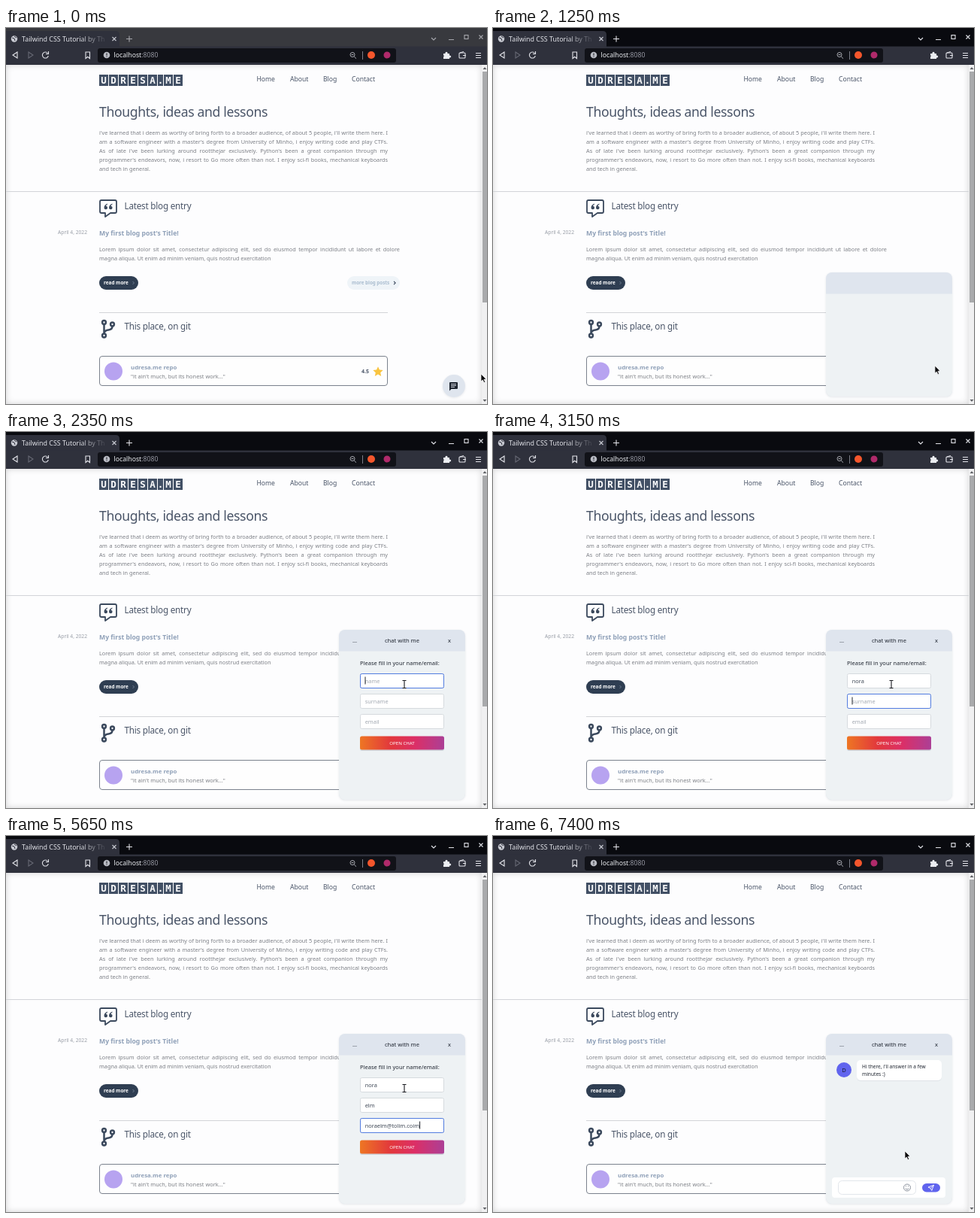
These frames come from a looping animation (640x500 px, 8 s). An HTML page:

```html
<!DOCTYPE html>
<html lang="en">
<head>
<meta charset="utf-8">
<title>Blog with chat</title>
<style>
  html, body { margin: 0; width: 100%; height: 100%; overflow: hidden; background: #fdfdfe; }
  body { position: relative; font-family: "Noto Sans", "Open Sans", sans-serif; }
  svg { position: absolute; left: 0; top: 0; display: block; }
  .stage { width: 640px; height: 500px; }
  .page { position: absolute; left: 0; top: 49px; width: 633px; height: 451px;
          box-shadow: inset 0 0 9px rgba(0, 0, 0, .17); }
  .ink { fill: #4a5568; }
  .title { font-size: 17.6px; letter-spacing: -.35px; }
  .section { font-size: 11.7px; letter-spacing: -.22px; }
  .icon { fill: none; stroke: #e3e4ea; stroke-width: 1.1; }
  .dark { fill: none; stroke: #3b495d; stroke-width: 1.8; stroke-linejoin: round; }
  .mid { text-anchor: middle; }

  .copy { position: absolute; left: 124px; font-size: 7.3px; font-weight: 300;
          line-height: 12px; color: #7c7f85; }
  .copy div { height: 12px; text-align: justify; text-align-last: justify; word-spacing: -.3px; }
  .copy div:last-child { text-align-last: left; word-spacing: 0; }
  .about { top: 133px; width: 384px; }
  .lorem { top: 288px; width: 400px; }

  .chat { position: absolute; overflow: hidden; background: #dfe5ee;
          box-shadow: 0 1px 3px rgba(60, 70, 90, .12); animation: open 8s ease-out infinite; }
  .chat svg { width: 168px; height: 226px; }
  .strip { animation: strip 8s step-end infinite; }
  .controls { animation: controls 8s step-end infinite; }
  .bubble { animation: bubble 8s linear infinite; }
  .body { animation: body 8s step-end infinite; }
  .labels { animation: labels 8s linear infinite; }
  .form { animation: form 8s linear infinite; }
  .talk { animation: talk 8s linear infinite; }
  .mouse { animation: mouse 8s ease-in-out infinite; }
  .arrow { animation: arrow 8s step-end infinite; }
  .beam { animation: beam 8s step-end infinite; }

  @keyframes open {
    0%, 11.25% { left: 581px; top: 461px; width: 30px; height: 30px; border-radius: 15px; }
    12.5%, 13.75% { left: 443px; top: 461px; width: 168px; height: 30px; border-radius: 8px; }
    17.5%, 100% { left: 443px; top: 263px; width: 168px; height: 226px; border-radius: 8px; }
  }
  @keyframes strip { 0% { fill: #38393e; } 11.25%, 100% { fill: #090a0f; } }
  @keyframes controls { 0% { opacity: .65; } 11.25%, 100% { opacity: 1; } }
  @keyframes bubble { 0%, 11.25% { opacity: 1; } 11.9%, 100% { opacity: 0; } }
  @keyframes body { 0% { opacity: 0; } 13.75%, 100% { opacity: 1; } }
  @keyframes labels { 0%, 16.5% { opacity: 0; } 18.5%, 100% { opacity: 1; } }
  @keyframes form { 0%, 17% { opacity: 0; } 19%, 89.5% { opacity: 1; } 90.5%, 100% { opacity: 0; } }
  @keyframes talk { 0%, 90% { opacity: 0; } 92.2%, 100% { opacity: 1; } }
  @keyframes mouse {
    0%, 6.25% { transform: translate(632px, 460px); }
    10.6%, 13.75% { transform: translate(596px, 465px); }
    21.5%, 86.25% { transform: translate(530px, 335px); }
    89.4%, 100% { transform: translate(548px, 419px); }
  }
  @keyframes arrow { 0% { opacity: 1; } 20.6% { opacity: 0; } 86.6%, 100% { opacity: 1; } }
  @keyframes beam { 0% { opacity: 0; } 20.6% { opacity: 1; } 86.6%, 100% { opacity: 0; } }
</style>
</head>
<body>
<div class="page"></div>

<svg class="stage" viewBox="0 0 640 500">
  <defs>
    <linearGradient id="fade" gradientUnits="userSpaceOnUse" x1="98" x2="135" y1="0" y2="0">
      <stop stop-color="#e1e2e8"/><stop offset="1" stop-color="#32343f"/>
    </linearGradient>
    <linearGradient id="sunset">
      <stop stop-color="#ee7623"/><stop offset=".36" stop-color="#e2383c"/>
      <stop offset=".65" stop-color="#dc2f66"/><stop offset="1" stop-color="#ac3f96"/>
    </linearGradient>
  </defs>

  <!-- browser -->
  <rect class="strip" width="640" height="25"/>
  <path d="M0 25V4h146q5 0 5 5v16z" fill="#2f313c"/>
  <rect y="24.5" width="640" height="24.5" fill="#2f313c"/>
  <circle cx="11" cy="14.5" r="4.2" fill="#c9cbd3"/>
  <path d="M8 13l3 1 1 3M11 11l3 2" fill="none" stroke="#2f313c"/>
  <path d="M141.5 12l5 5m0-5l-5 5" stroke="#c9cbd3" stroke-width="1.1"/>
  <text x="21" y="17.8" font-size="8.9" fill="url(#fade)">Tailwind CSS Tutorial by Th</text>
  <g class="icon controls">
    <path d="M160 14.5h8m-4-4v8M566 13l3 3 3-3M589 15.5h7M629.5 9.5l5 5m0-5l-5 5"/>
    <rect x="610" y="9.5" width="5" height="5"/>
  </g>
  <g class="icon">
    <path d="M15 32l-6 4 6 4z"/>
    <path d="M30 32l6 4-6 4z" stroke="#666874"/>
    <path d="M55.5 33.5a4 4 0 1 0 .8 3.5M56.5 31v3.5h-3.5"/>
    <path d="M106 32h5.5v8.5l-2.75-2.2-2.75 2.2z"/>
  </g>
  <rect x="122" y="27" width="397" height="19" rx="3" fill="#111218"/>
  <circle cx="134" cy="36" r="4.3" fill="#b9bbc3"/>
  <path d="M134 33.5v3m0 1v1" stroke="#111218"/>
  <text x="143.5" y="39.3" font-size="8.7" fill="#eceef2">localhost<tspan fill="#9799a3">:8080</tspan></text>
  <g fill="none" stroke="#b9bbc3" stroke-width=".9">
    <circle cx="461" cy="35.5" r="3"/>
    <path d="M463.3 38l2.7 2.7M459.5 35.5h3"/>
  </g>
  <path d="M474.5 31v11" stroke="#7b7d87"/>
  <circle cx="486" cy="36" r="5" fill="#f4562c"/>
  <circle cx="507" cy="36" r="4.5" fill="#b02a6b"/>
  <path d="M582 34h2.5a1.6 1.6 0 1 1 3 0h2.5v2.5a1.6 1.6 0 1 1 0 3v1.5h-8v-2.5a1.5 1.5 0 0 0 0-2.5z" fill="#eceef2"/>
  <g class="icon">
    <rect x="603" y="33" width="8" height="7" rx="1"/>
    <path d="M604 33l5-1.5M608 36.5h4M625 33.5h7m-7 3h7m-7 3h7"/>
  </g>

  <!-- scrollbar -->
  <rect x="633" y="49" width="7" height="451" fill="#f0f0f1"/>
  <rect x="634" y="58" width="6" height="307" fill="#a9aaac"/>
  <path d="M634.5 55l2.5-3 2.5 3zM634.5 494l2.5 3 2.5-3z" fill="#606266"/>

  <!-- header -->
  <g id="logo" class="mid" font-family="'DejaVu Sans Mono', monospace" font-weight="700" font-size="12.5"></g>
  <g class="ink" font-size="8.6">
    <text x="333.5" y="71.2">Home</text><text x="378" y="71.2">About</text>
    <text x="422" y="71.2">Blog</text><text x="460" y="71.2">Contact</text>
  </g>
  <text class="ink title" x="124" y="118">Thoughts, ideas and lessons</text>
  <path d="M0 217.5h633" stroke="#d2d4d8"/>

  <!-- latest entry -->
  <path class="dark" d="M127 229h18q2 0 2 2v13q0 2-2 2h-6l-7 5v-5h-5q-2 0-2-2v-13q0-2 2-2z"/>
  <path d="M135 233.5q-4.5 1.5-4.5 5.5a2.3 2.3 0 1 0 2.5-2.3q.3-1.5 2-2.2zm6.5 0q-4.5 1.5-4.5 5.5a2.3 2.3 0 1 0 2.5-2.3q.3-1.5 2-2.2z" fill="#3b495d"/>
  <text class="ink section" x="157.5" y="241">Latest blog entry</text>
  <text x="69" y="274.3" font-size="6.7" font-weight="300" fill="#9a9fa8">April 4, 2022</text>
  <text x="124" y="276" font-size="8.65" font-weight="700" fill="#8fa0b8">My first blog post's Title!</text>
  <rect x="124" y="330" width="52" height="18" rx="9" fill="#2f3e52"/>
  <text x="130" y="341.3" font-size="6.4" font-weight="700" fill="#fff">read more</text>
  <path d="M168.5 337l2 2-2 2" fill="none" stroke="#6d7c90"/>
  <rect x="454" y="330" width="70" height="18" rx="9" fill="#eff4f8"/>
  <text x="460" y="341.3" font-size="6.25" font-weight="700" fill="#a9bccf">more blog posts</text>
  <path d="M516 336.8l2.2 2.2-2.2 2.2" fill="none" stroke="#3b495d" stroke-width="1.1"/>
  <path d="M124 378.5h384" stroke="#d2d4d8"/>

  <!-- repository -->
  <g class="dark" stroke-width="2.5" style="stroke-width: 2.5">
    <circle cx="130.5" cy="391.5" r="2.4"/><circle cx="130.5" cy="409" r="2.4"/>
    <circle cx="141.5" cy="394" r="2.4"/>
    <path d="M130.5 394v13M141.5 396.5q0 4.5-5 5-5 .5-6 4"/>
  </g>
  <text class="ink section" x="157.5" y="401">This place, on git</text>
  <rect x="124.5" y="436.5" width="383" height="39" rx="3.5" fill="#fefefe" stroke="#7b828d"/>
  <circle cx="143" cy="456.5" r="12" fill="#b7a3f0"/>
  <text x="166" y="454" font-size="7.85" font-weight="700" fill="#8fa0b8">udresa.me repo</text>
  <text x="166" y="466" font-size="7.4" font-weight="300" fill="#7c7f85">"it ain't much, but its honest work..."</text>
  <text x="473" y="459" font-size="7" font-weight="600" fill="#4a5568">4.5</text>
  <path d="M495 450.3l2 4.3 4.7.5-3.5 3.2 1 4.7-4.2-2.4-4.2 2.4 1-4.7-3.5-3.2 4.7-.5z" fill="#f9c440"/>
</svg>

<div class="copy about">
  <div>i've learned that i deem as worthy of bring forth to a broader audience, of about 5 people, i'll write them here. I</div>
  <div>am a software engineer with a master's degree from University of Minho, i enjoy writing code and play CTFs.</div>
  <div>As of late i've been lurking around rootthejar exclusively. Python's been a great companion through my</div>
  <div>programmer's endeavors, now, i resort to Go more often than not. I enjoy sci-fi books, mechanical keyboards</div>
  <div>and tech in general.</div>
</div>
<div class="copy lorem">
  <div>Lorem ipsum dolor sit amet, consectetur adipiscing elit, sed do eiusmod tempor incididunt ut labore et dolore</div>
  <div>magna aliqua. Ut enim ad minim veniam, quis nostrud exercitation</div>
</div>

<div class="chat">
  <svg viewBox="443 263 168 226">
    <rect class="body" x="443" y="291.5" width="168" height="198" fill="#eef2f4"/>
    <g class="labels mid" font-size="7.6" fill="#1f2530">
      <text x="464" y="280">...</text><text x="527" y="280">chat with me</text><text x="590" y="280">x</text>
    </g>
    <g class="form">
      <text x="471" y="310" font-size="7.5" fill="#1f2530">Please fill in your name/email:</text>
      <g id="fields" font-size="7.4"></g>
      <rect id="caret" width="1" height="10" fill="#20242c"/>
      <rect x="471" y="406" width="112" height="18" rx="2.5" fill="#8a94a5" opacity=".3"/>
      <rect x="471" y="404.5" width="112" height="18" rx="2.5" fill="url(#sunset)"/>
      <text class="mid" x="527" y="415.9" font-size="6.15" fill="#fff">OPEN CHAT</text>
    </g>
    <g class="talk">
      <circle cx="467" cy="311" r="10" fill="#6064ee"/>
      <text class="mid" x="467" y="313.7" font-size="7.5" fill="#15172a">D</text>
      <rect x="484" y="299" width="113" height="27" rx="5" fill="#dfe3e8"/>
      <rect x="484" y="298" width="113" height="27" rx="5" fill="#fff"/>
      <g font-size="6.6" fill="#1f2530">
        <text x="491" y="309">Hi there, i'll answer in a few</text><text x="491" y="318.7">minutes :)</text>
      </g>
      <rect x="451" y="454" width="151" height="27" rx="4" fill="#fff"/>
      <rect x="459.5" y="458.5" width="103" height="18" rx="5" fill="#fff" stroke="#e2e6eb"/>
      <g fill="none" stroke="#7d8591" stroke-width=".9">
        <circle cx="551" cy="467.5" r="4.5"/>
        <path d="M548.7 468.8q2.3 2.6 4.6 0M549.5 465v1.2m3-1.2v1.2"/>
      </g>
      <rect x="571" y="462" width="24" height="11.5" rx="5.75" fill="#6064ee"/>
      <path d="M579 467l7.5-2.8-2.7 7.3-1.6-3zm3.2 1.5l4.3-4.3" fill="none" stroke="#fff" stroke-width=".9" stroke-linejoin="round"/>
    </g>
  </svg>
</div>

<svg class="stage" viewBox="0 0 640 500">
  <g class="bubble">
    <path d="M591 471h9q1 0 1 1v7q0 1-1 1h-7.500l-2.500 2.500v-10.500q0-1 1-1z" fill="#1b222d"/>
    <path d="M592 473.5h7m-7 2h7m-7 2h5" stroke="#dfe5ee" stroke-width=".9"/>
  </g>
  <g class="mouse">
    <path class="arrow" d="M0 0v10l2.3-2 1.7 3.6 1.7-.8-1.7-3.5 3-.3z" fill="#0b0b0d" stroke="#fff" stroke-width=".7"/>
    <path class="beam" d="M-2.5-4.5h2l.5.5.5-.5h2M0-4v9M-2.5 5.5h2l.5-.5.5.5h2" fill="none" stroke="#15171c" stroke-width="1.1"/>
  </g>
</svg>

<script>
  const LOOP = 8000, LEFT = 477.7;
  const $ = id => document.getElementById(id);

  // wordmark: one dark tile per letter
  let x = 124;
  $('logo').innerHTML = [..."UDRESA.ME"].map(ch => {
    const w = ch === '.' ? 7 : 12;
    const tile = `<rect x="${x}" y="62" width="${w}" height="15" fill="#425065"/>
      <text x="${x + w / 2}" y="74" fill="#fdfdfe">${ch}</text>`;
    x += w + 1;
    return tile;
  }).join('');

  // keys: time of each typed letter; focus: from, to
  const fields = [
    { hint: 'name', y: 321, text: 'nora', keys: [2800, 2850, 2950, 3000], focus: [2200, 3050] },
    { hint: 'surname', y: 348, text: 'elm', keys: [3350, 3450, 3500], focus: [3050, 3550] },
    { hint: 'email', y: 375, text: 'noraelm@tolim.coim', focus: [3550, 7200],
      keys: [4100, 4200, 4350, 4450, 4650, 4700, 4750, 4900, 5150,
             5200, 5250, 5300, 5350, 5400, 5450, 5500, 5600, 5650] }
  ];
  const caretOff = [[2600, 2800], [3900, 4100], [5950, 6100]];

  $('fields').innerHTML = fields.map(f => {
    const box = `x="471.5" y="${f.y + .5}" width="111" height="19" rx="2"`;
    return `<rect ${box} fill="#fff" stroke="#d6dade"/>
      <rect class="ring" ${box} fill="none" stroke="#527ce0"/>
      <text x="${LEFT}" y="${f.y + 12.7}"></text>`;
  }).join('');
  const rings = document.querySelectorAll('.ring');
  const texts = document.querySelectorAll('#fields text');

  const within = (t, [a, b]) => t >= a && t < b;

  function valueAt(f, t) {
    const typed = f.text.slice(0, f.keys.filter(k => k <= t).length);
    // the mistyped ending is rubbed out and corrected
    if (f.hint !== 'email' || t < 6150) return typed;
    return t < 6250 ? typed.slice(0, -1) : typed.slice(0, -2) + (t < 6550 ? '' : 'm');
  }

  function draw(now) {
    const t = now % LOOP;
    let caret = false;
    fields.forEach((f, i) => {
      const value = valueAt(f, t), active = within(t, f.focus), label = texts[i];
      label.textContent = value || f.hint;
      label.setAttribute('fill', value ? '#3f4856' : '#a3a9b2');
      rings[i].setAttribute('opacity', active ? Math.min(1, (t - f.focus[0]) / 100) : 0);
      if (active) {
        caret = !caretOff.some(span => within(t, span));
        $('caret').setAttribute('x', LEFT + (value ? label.getComputedTextLength() : -.2));
        $('caret').setAttribute('y', f.y + 4.5);
      }
    });
    $('caret').setAttribute('opacity', caret ? 1 : 0);
    requestAnimationFrame(draw);
  }
  draw(performance.now());
</script>
</body>
</html>
```
